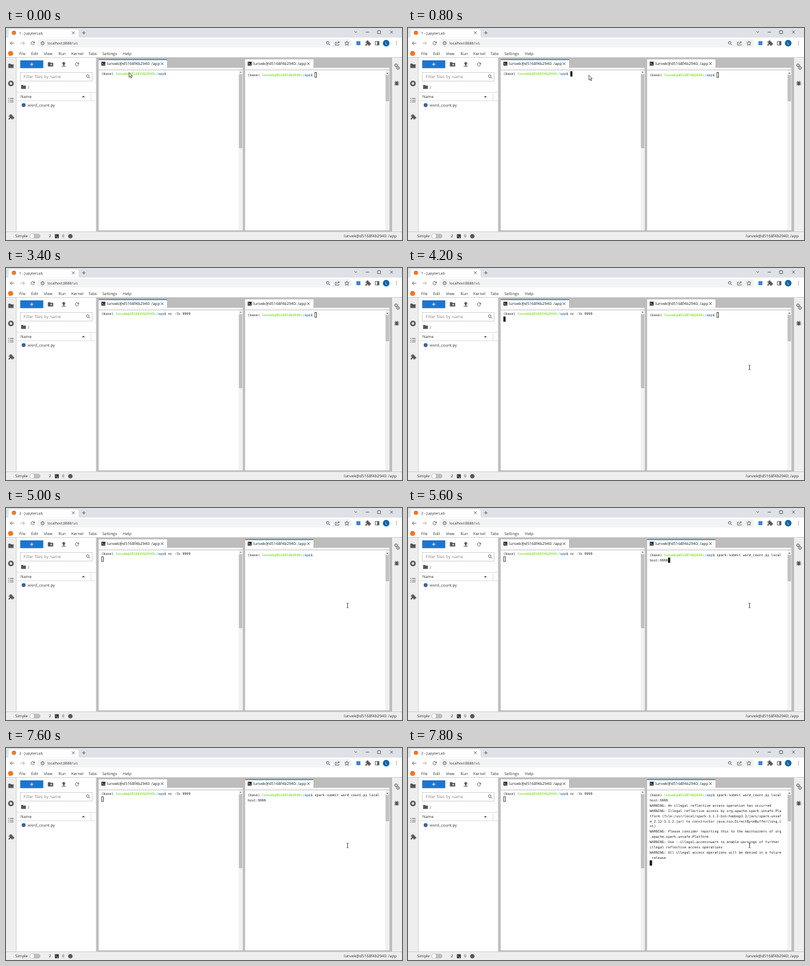
Animation, 600 px wide and 321 px high, one loop 8000 ms. Source, as an HTML page:

```html
<!DOCTYPE html>
<html lang="en">
<head>
<meta charset="utf-8">
<title>Notebook terminals</title>
<style>
  html, body { margin: 0; height: 100%; overflow: hidden; background: #fff; }
  svg { display: block; width: 100vw; height: 100vh; }
  text { font: 6px "Open Sans", "Noto Sans", sans-serif; fill: #333; white-space: pre; text-rendering: geometricPrecision; }
  .term text { font: 5.1px "DejaVu Sans Mono", monospace; fill: #222; }
  .term .user { font-weight: bold; fill: #8ae234; }
  .term .path { font-weight: bold; fill: #5f92cc; }
  .line { fill: none; stroke: #5a5d61; stroke-width: .9; }
  .solid { fill: #555; }
  .dock { fill: #bdbdbd; }
  .bar { fill: #eee; }
  .blue { fill: #1976d2; }
</style>
</head>
<body>
<svg viewBox="0 0 600 321" preserveAspectRatio="none">
  <defs>
    <path id="folder" class="solid" d="M-4-3h3l1 1h4v5.5h-8z"/>
    <path id="puzzle" class="solid" d="M-3.5-2H-1.5a1.4 1.4 0 1 1 2.6 0H3V0a1.4 1.4 0 1 1 0 2.6V4H1a1.3 1.3 0 1 0-2.4 0H-3.5V1.8a1.3 1.3 0 1 0 0-2.4z"/>
    <path id="close" class="line" d="M-2-2l4 4M2-2l-4 4"/>
    <path id="plus" class="line" d="M-2.5 0h5M0-2.5v5"/>
    <g id="reload"><path class="line" d="M2-1.6A2.5 2.5 0 1 0 2.5.5"/><path class="solid" d="M3-3v2.8H.2z"/></g>
    <g id="search" class="line"><circle cx="-.6" cy="-.6" r="2"/><path d="M1 1l2 2"/></g>
    <g id="prompt"><rect x="-3" y="-3" width="6" height="6" fill="#333"/><path d="M-2-1.5l1.5 1.5-1.5 1.5M.2 1.6h1.8" fill="none" stroke="#fff" stroke-width=".6"/></g>
    <g id="gear" class="line"><circle r="1.6"/><circle r="2.6" stroke-dasharray="1 1.04"/></g>
  </defs>
  <rect width="600" height="321" fill="#fff"/>

  <!-- browser -->
  <rect width="600" height="14.5" fill="#dee1e6"/>
  <path d="M2 14.5q2 0 2-2V5q0-3 3-3H107q3 0 3 3v7.500q0 2 2 2z" fill="#fff"/>
  <circle cx="12" cy="7.300" r="3.300" fill="#f37726"/>
  <text id="title" x="20" y="9.500" style="font-size:5.6px"></text>
  <use href="#close" x="102" y="7.300"/>
  <use href="#plus" x="118" y="7.300"/>
  <path class="line" d="M528 5l2 2 2-2M545 6.300h5M563 4h4.500v4.500H563z"/>
  <use href="#close" x="584" y="6.300"/>
  <rect x="47" y="16.500" width="478" height="13" rx="6.500" fill="#f1f3f4"/>
  <path class="line" d="M12.500 23H6.500m2.700-2.700L6.500 23l2.700 2.700"/>
  <path class="line" d="M22 23h6m-2.700-2.700L28 23l-2.700 2.700" style="stroke:#aaa"/>
  <use href="#reload" x="40.500" y="23"/>
  <g class="line"><circle cx="55.500" cy="23" r="2.400"/><path d="M55.500 22.500v1.800M55.500 21.200v.7"/></g>
  <text x="63" y="25.200" style="font-size:5.4px">localhost:8888<tspan fill="#666">/lab</tspan></text>
  <use href="#search" x="488" y="23"/>
  <path class="line" d="M501 21.500h-1.800v4.500h5.500v-1.500M501 24q.5-2.500 4-2.500m-1.500-1.500l1.700 1.500-1.700 1.500"/>
  <path class="line" d="M516.500 19.800l.9 2.200 2.300.2-1.700 1.600.5 2.300-2-1.200-2 1.200.5-2.300-1.700-1.600 2.300-.2z" stroke-width=".7"/>
  <rect x="531" y="20" width="6" height="6" fill="#3b82d8"/>
  <use href="#puzzle" x="548" y="22.700"/>
  <path class="line" d="M559.500 20.300h5.500v5.500h-5.500z"/><path class="solid" d="M562.500 20h2.800v6h-2.800z"/>
  <circle cx="576" cy="23" r="5" fill="#0d64ad"/>
  <text x="576" y="25" text-anchor="middle" style="fill:#fff;font-size:5.5px">L</text>
  <path class="line" d="M591.500 20v7" stroke-dasharray="1.100 1.300"/>

  <!-- menu, side bars, status bar -->
  <circle cx="7" cy="38.500" r="3.800" fill="#f37726"/>
  <g id="menu"></g>
  <rect class="bar" y="44.500" width="15.500" height="265"/>
  <rect class="bar" x="585" y="44.500" width="15" height="265"/>
  <rect class="bar" y="308.500" width="600" height="12.500"/>
  <path d="M0 44.500H600M15.500 44.500V308.500M0 308.500H600" fill="none" stroke="#c4c4c4" stroke-width=".7"/>
  <use href="#folder" x="7.500" y="57"/>
  <circle cx="7.500" cy="84" r="4.300" class="solid"/><rect x="5.900" y="82.400" width="3.200" height="3.200" fill="#fff"/>
  <path class="line" d="M3.500 106.500h1.500M6 106.500h5.500M3.500 109.300h1.500M6 109.300h5.500M3.500 112h1.500M6 112h5.500" stroke-width="1.200"/>
  <use href="#puzzle" x="7.500" y="134.500"/>
  <use href="#gear" x="591" y="56.500"/><use href="#gear" x="594" y="60.500"/>
  <ellipse cx="592" cy="84" rx="2.200" ry="3" class="solid"/>
  <path class="line" d="M588.500 82h7M588.500 84h7M588.500 86h7M590 80l1 1m3-1l-1 1" stroke-width=".7"/>
  <text x="14" y="317">Simple</text>
  <rect x="35.500" y="311.500" width="16.500" height="7" rx="3.500" fill="#bdbdbd"/>
  <circle cx="39.500" cy="315" r="3" fill="#fff"/>
  <text x="65" y="317">2</text><use href="#prompt" x="77" y="315.300"/><text x="85" y="317">0</text>
  <circle cx="97.500" cy="315.200" r="3.200" class="solid"/><use href="#gear" x="97.500" y="315.200"/>
  <text id="status" x="592" y="317" text-anchor="end"></text>

  <!-- file browser -->
  <rect class="blue" x="21.500" y="49" width="35" height="11.800"/>
  <use href="#plus" x="39" y="55" style="filter:brightness(0) invert(1)"/>
  <use href="#folder" x="67.500" y="54.800"/><path d="M67 55.500h3M68.500 54v3" stroke="#fff" stroke-width=".7"/>
  <path class="solid" d="M87.500 51l3 3h-1.700v2.700h-2.600V54h-1.700zM84.500 57.500h6v1h-6z"/>
  <use href="#reload" x="107.500" y="55"/>
  <rect x="21.500" y="67.300" width="109" height="13" fill="#fff" stroke="#c8c8c8" stroke-width=".8"/>
  <text x="26.500" y="75.800" style="font-size:6.5px;fill:#888">Filter files by name</text>
  <use href="#search" x="124.500" y="73.500"/>
  <use href="#folder" x="26.500" y="89" transform="translate(2.650 8.900) scale(.9)"/><text x="33" y="91.500">/</text>
  <path d="M16 97.500H136M16 110H136M129 98V110" stroke="#d4d4d4" stroke-width=".7"/>
  <text x="22" y="106.200" style="font-weight:500">Name</text>
  <path class="solid" d="M115 105l2.300-2.500 2.300 2.500z"/>
  <circle cx="26.700" cy="116.700" r="3" fill="#306998"/>
  <text x="33" y="118.800">word_count.py</text>

  <rect class="dock" x="136.500" y="45" width="448.500" height="263.500"/>
  <g id="panes"></g>
  <path id="arrow" d="M0 0v7.200l1.700-1.500 1.200 2.600 1.200-.5-1.200-2.600h2.300z" fill="#fff" stroke="#222" stroke-width=".7"/>
  <path id="beam" d="M-1.500-3.500h1L0-3l.5-.5h1M0-3V3M-1.500 3.500h1L0 3l.5.500h1" fill="none" stroke="#333" stroke-width=".8"/>
</svg>
<script>
const LOOP = 8000, STEP = 200, CHAR = 3.07, ROW = 7.92, COLUMNS = 65, FOCUS_SWAP = 4400;
const USER = 'lunvek@d5168f4b2940';
const PROMPT = `(base) ${USER}:/app$ `;
const WARNINGS = [
  'An illegal reflective access operation has occurred',
  'Illegal reflective access by org.apache.spark.unsafe.Platform (file:/usr/local/spark-3.1.2-bin-hadoop3.2/jars/spark-unsafe_2.12-3.1.2.jar) to constructor java.nio.DirectByteBuffer(long,int)',
  'Please consider reporting this to the maintainers of org.apache.spark.unsafe.Platform',
  'Use --illegal-access=warn to enable warnings of further illegal reflective access operations',
  'All illegal access operations will be denied in a future release',
].map(line => 'WARNING: ' + line + '\n').join('');
const SUBMIT = 'spark-submit word_count.py localhost:9999';

// Each track lists [start time, values...]
const LEFT = {
  text: [[0, ''], [1600, 'nc -l'], [2000, 'nc -lk 9'], [2200, 'nc -lk 9999'], [3000, 'nc -lk 9999\n']],
  blink: [[0, 0], [400, 1], [1000, 0], [1600, 1], [2800, 0], [3000, 1], [3400, 0], [4000, 1]],
};
const RIGHT = {
  text: [[0, ''], [5400, SUBMIT], [7000, SUBMIT + '\n'], [7800, SUBMIT + '\n' + WARNINGS]],
  blink: [[0, 1], [5000, 0], [5200, 1], [6000, 0], [6600, 1], [7600, 0], [7800, 1]],
};
const POINTER = [
  [0, 186.5, 67.5], [200, 207, 68.5], [400, 248, 70.5], [600, 270, 71.5], [800, 274, 71.5], [1200, -20, -20],
  [3800, 440, 290], [4000, 500, 190], [4200, 517.5, 150.5], [4400, 517.5, 148.5], [4600, 517.5, 147.5],
];

const $ = id => document.getElementById(id);
const at = (track, t) => track.findLast(key => key[0] <= t).slice(1);

function add(parent, tag, attrs = {}, text = '') {
  const el = document.createElementNS('http://www.w3.org/2000/svg', tag);
  for (const name in attrs) el.setAttribute(name, attrs[name]);
  el.textContent = text;
  return parent.appendChild(el);
}

function makePane(x, width, top, thumb, track) {
  const g = add($('panes'), 'g', { class: 'term' });
  const rect = (x, y, width, height, fill) => add(g, 'rect', { x, y, width, height, fill });
  const right = x + width, bar = right - 6;
  rect(x, 47.5, 103.5, 13, '#fff');
  const accent = rect(x, 47.2, 103.5, 1.3, '#1976d2');
  add(g, 'use', { href: '#prompt', x: x + 7, y: 54 });
  add(g, 'text', { x: x + 12.5, y: 56, style: 'font:6px "Open Sans",sans-serif' }, USER + ': /app');
  add(g, 'use', { href: '#close', x: x + 96, y: 54 });
  rect(x, 60.3, width, 246, '#fff');
  rect(x, 63.2, width, .7, '#aaa');
  rect(bar, 64, 6, 242, '#f1f1f1');
  rect(bar + .4, thumb[0], 5.2, thumb[1], '#c1c1c1');
  add(g, 'path', { class: 'solid', d: `M${bar + 1.5} ${top + 2}l1.500-1.600 1.500 1.600z` });
  const left = x + 4, lines = add(g, 'g');
  const cursor = add(g, 'rect', { stroke: '#111', 'stroke-width': .7, width: 2.6, height: 7.2 });
  let shown;

  function write(content) {
    lines.textContent = '';
    const rows = (PROMPT + content).split('\n')
      .flatMap(line => line.match(new RegExp(`.{1,${COLUMNS}}`, 'g')) || ['']);
    rows.forEach((row, i) => {
      const line = add(lines, 'text', { x: left, y: top + i * ROW + 5.7 });
      if (i) { line.textContent = row; return; }
      const parts = [['(base) '], [USER, 'user'], [':'], ['/app', 'path'], [row.slice(PROMPT.length - 2)]];
      for (const [text, name = ''] of parts) add(line, 'tspan', { class: name }, text);
    });
    cursor.setAttribute('x', left + rows.at(-1).length * CHAR + .4);
    cursor.setAttribute('y', top + (rows.length - 1) * ROW + .4);
  }

  return (t, focused) => {
    const [content] = at(track.text, t), [lit] = at(track.blink, t);
    if (content !== shown) write(shown = content);
    accent.style.display = focused ? '' : 'none';
    cursor.style.display = !focused || lit ? '' : 'none';
    cursor.setAttribute('fill', focused ? '#111' : 'none');
  };
}

const menu = { File: 20, Edit: 38, View: 57.5, Run: 79.5, Kernel: 99, Tabs: 125, Settings: 146, Help: 177 };
for (const name in menu) add($('menu'), 'text', { x: menu[name], y: 40.6 }, name);
$('status').textContent = USER + ': /app';

const drawLeft = makePane(140.5, 218, 65.5, [70, 112], LEFT);
const drawRight = makePane(362.3, 218.5, 67.2, [71, 40], RIGHT);

function frame(now) {
  const t = Math.floor(now % LOOP / STEP) * STEP;
  const swapped = t >= FOCUS_SWAP;
  drawLeft(t, !swapped);
  drawRight(t, swapped);
  $('title').textContent = `${swapped ? 2 : 1} - JupyterLab`;
  const [x, y] = at(POINTER, t), beam = t >= 3800;
  for (const id of ['arrow', 'beam']) {
    $(id).setAttribute('transform', `translate(${x} ${y})`);
    $(id).style.display = (id === 'beam') === beam ? '' : 'none';
  }
  requestAnimationFrame(frame);
}
frame(performance.now());
</script>
</body>
</html>
```
